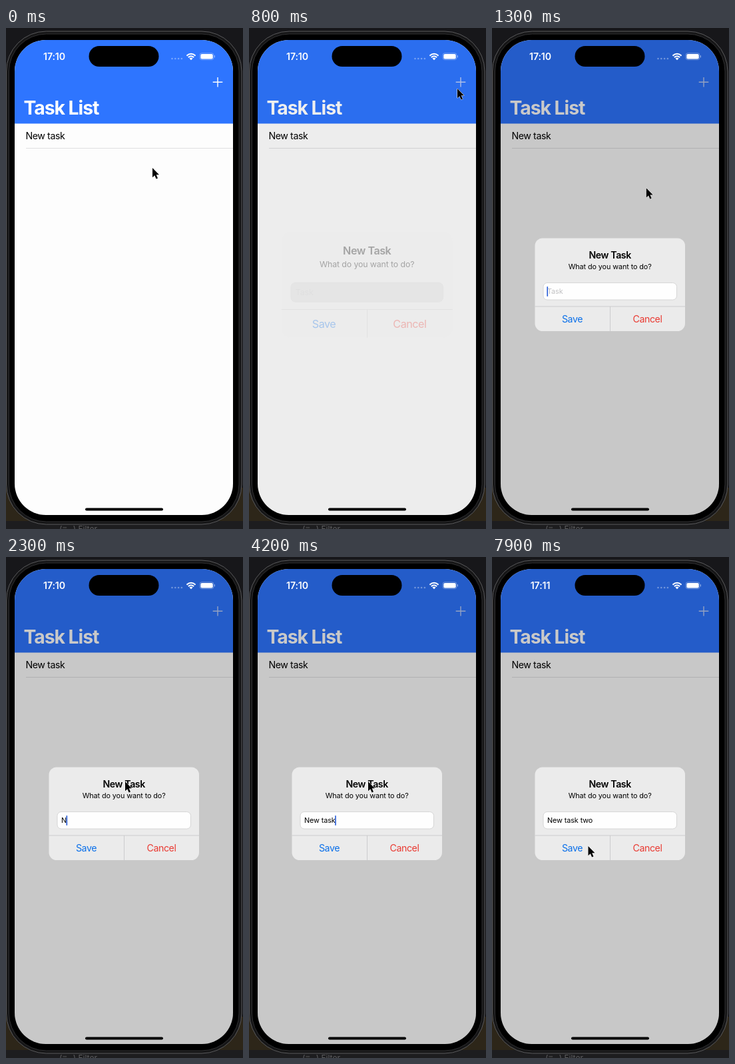
These frames come from a looping animation (356x752 px, 8 s). An HTML page:

```html
<!DOCTYPE html>
<html lang="en">
<head>
<meta charset="utf-8">
<title>Task List</title>
<style>
  html, body { margin: 0; width: 100%; height: 100%; overflow: hidden; background: #17171a; }
  svg { display: block; width: 356px; height: 752px; }
  text { font-family: Inter, "Open Sans", sans-serif; white-space: pre; }
  .body { font-size: 14.2px; letter-spacing: -.03em; }
  .small { font-size: 10.85px; letter-spacing: -.01em; }
  .bold { font-weight: 600; }
  .mid { text-anchor: middle; }
</style>
</head>
<body>
<svg viewBox="0 0 356 752">
  <defs>
    <clipPath id="screen"><rect x="13" y="18" width="328" height="713" rx="47"/></clipPath>
    <clipPath id="wedge"><path d="M278 48.2L266.8 37H289.2Z"/></clipPath>
  </defs>

  <!-- desktop behind the phone -->
  <rect width="356" height="752" fill="#17171a"/>
  <rect y="690" width="356" height="50" fill="#2d2619"/>
  <rect y="740" width="356" height="12" fill="#1d1d1f"/>
  <text x="80" y="756" font-size="12" fill="#5c5c5e">(≡⌄) Filter</text>

  <!-- phone body -->
  <rect x=".5" y="5" width="353.5" height="740" rx="60" fill="#161617" stroke="#5a5a5c"/>
  <rect x="4.5" y="9" width="345.5" height="732" rx="56" stroke="#303032"/>

  <g clip-path="url(#screen)">
    <rect x="13" y="18" width="328" height="713" fill="#fdfdfd"/>
    <rect x="13" y="18" width="328" height="125.5" fill="#2e75ff"/>
    <text x="26.5" y="130" font-size="28.4" font-weight="700" letter-spacing="-.038em" fill="#fff">Task List</text>
    <path id="plus" d="M310.7 81.3H325.3M318 74V88.6" stroke-width="1.4"/>
    <path d="M30 180.5H341" stroke="#dfdfe1"/>
    <rect id="dim" x="13" y="18" width="328" height="713"/>
    <text class="body" x="29.5" y="167">New task</text>
  </g>

  <!-- status bar -->
  <rect x="124.5" y="27" width="105" height="31" rx="15.5"/>
  <rect x="119" y="720.5" width="117" height="4" rx="2"/>
  <g fill="#fff">
    <text id="clock" class="bold mid" x="72.5" y="47.5" font-size="14.2" letter-spacing="-.01em"></text>
    <path d="M249.5 46H264.5" stroke="#fff" stroke-opacity=".35" stroke-width="2.7" stroke-linecap="round" stroke-dasharray="0 4.8"/>
    <g clip-path="url(#wedge)">
      <circle cx="278" cy="47.4" r="2.8"/>
      <g fill="none" stroke="#fff" stroke-width="2"><circle cx="278" cy="47.4" r="5.2"/><circle cx="278" cy="47.4" r="8.6"/></g>
    </g>
    <rect x="291" y="37.7" width="21" height="10" rx="3.2" fill="none" stroke="#fff" stroke-opacity=".4" stroke-width=".8"/>
    <rect x="292.3" y="39" width="18.4" height="7.4" rx="2"/>
    <rect x="312.8" y="41" width="1.2" height="3.4" rx=".6" opacity=".45"/>
  </g>

  <!-- alert -->
  <g id="alert">
    <rect x="64.5" y="315.5" width="225.5" height="139.5" rx="11.5" fill="#ebebeb"/>
    <text class="body bold mid" x="177.2" y="345.5">New Task</text>
    <text class="small mid" x="177.2" y="362">What do you want to do?</text>
    <rect id="field" x="77" y="382.5" width="200.5" height="25.5" rx="6" stroke="#cfcfcf" stroke-width=".8"/>
    <text id="hint" class="small" x="83" y="399.3" fill="#c0c0c2">Task</text>
    <text id="entry" class="small" x="83" y="399.3"></text>
    <rect id="caret" y="388" width="1.7" height="15" rx=".8" fill="#2f62d9"/>
    <path d="M64.5 418H290M177.5 418V455" stroke="#c9c9cb" stroke-width=".9"/>
    <text class="body mid" x="120.5" y="442" fill="#0b70ea">Save</text>
    <text class="body mid" x="233.5" y="442" fill="#ea3a32">Cancel</text>
  </g>

  <path id="pointer" d="M0 0V14.2L3.3 11.2L5.6 16.5L8 15.4L5.7 10.2H10Z" stroke="#fff" stroke-width="1" paint-order="stroke" stroke-linejoin="round"/>
</svg>

<script>
const LOOP = 8000, STEP = 100;
const MESSAGE = "New task two";
const KEY_TIMES = [2300, 2800, 3000, 3300, 3500, 3800, 4100, 4200, 4600, 5600, 6000, 6500];
const ALERT_IN = [0, .3, .83, .95, 1];   // progress at each step from 700 ms
const MOVES = [                          // start, end, target x, y
  [0, 600, 313, 91],
  [900, 1600, 179, 337],
  [7600, 7900, 144.5, 434],
];

const $ = id => document.getElementById(id);
const set = (id, attrs) => {
  for (const name in attrs) $(id).setAttribute(name, attrs[name]);
};
const smooth = (t, a, b) => {
  const u = Math.min(1, Math.max(0, (t - a) / (b - a)));
  return u * u * (3 - 2 * u);
};

function pointerAt(t) {
  let x = 220, y = 210;
  for (const [start, end, toX, toY] of MOVES) {
    const k = smooth(t, start, end);
    x += (toX - x) * k;
    y += (toY - y) * k;
  }
  return `translate(${x} ${y})`;
}

function caretOpacity(t) {
  if (t < 900 || t >= 7100) return 0;
  if (t >= 1800 && t < 2100) return t < 1900 ? .5 : 0;
  return 1;
}

function draw(t) {
  const step = Math.max(0, Math.min(ALERT_IN.length - 1, (t - 700) / STEP));
  const shown = ALERT_IN[step];
  const scale = 1.2 - .2 * shown;
  const grey = 194 + 60 * shown;

  set("dim", { opacity: .213 * shown });
  set("plus", { stroke: t < 600 ? "#fff" : "#bccdf5" });
  set("alert", {
    opacity: shown,
    transform: `translate(177.2 385.2) scale(${scale}) translate(-177.2 -385.2)`,
  });
  set("field", { fill: `rgb(${grey},${grey},${grey})` });

  const typed = MESSAGE.slice(0, KEY_TIMES.filter(k => k <= t).length);
  $("entry").textContent = typed;
  set("hint", { opacity: typed ? 0 : 1 });
  const width = typed ? $("entry").getComputedTextLength() : 0;
  set("caret", { x: 82.4 + width, opacity: caretOpacity(t) });

  $("clock").textContent = t < 4900 ? "17:10" : "17:11";
  set("pointer", { transform: pointerAt(t) });
}

const began = performance.now();
function frame() {
  const t = (performance.now() - began) % LOOP;
  draw(Math.floor(t / STEP) * STEP);
  requestAnimationFrame(frame);
}
frame();
</script>
</body>
</html>
```
